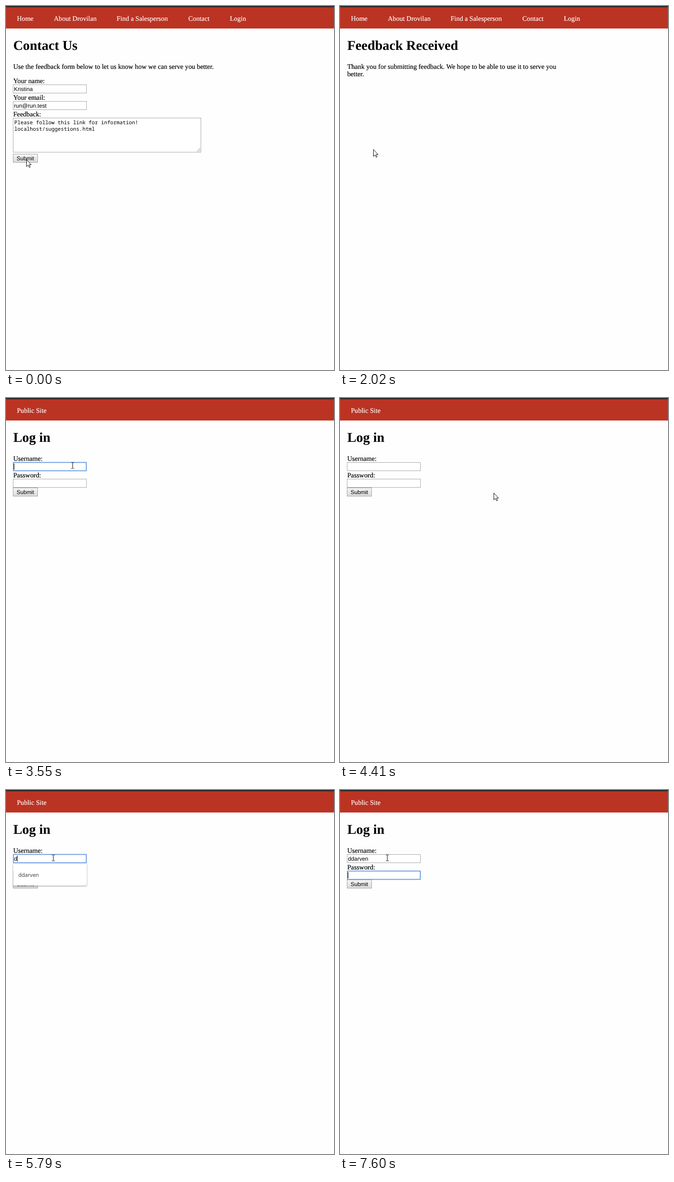
Animation of 711 by 788 pixels, one loop 8 s. Source, as an HTML page:

```html
<!DOCTYPE html>
<html lang="en">
<head>
<meta charset="utf-8">
<title>Feedback form and login</title>
<style>
html, body { margin: 0; width: 100%; height: 100%; overflow: hidden; background: #fefefe; }
svg { display: block; width: 711px; height: 788px; }
text { font: 14.73px "Liberation Serif", serif; white-space: pre; text-rendering: geometricPrecision; stroke: #000; stroke-width: .2px; }
.nav text { font-size: 14.7px; fill: #fff; stroke: #fff; }
.h { font-size: 29.33px; font-weight: bold; stroke: none; }
.field { font: 12.2px "Liberation Sans", sans-serif; stroke: none; }
.mono { font: 11.2px "Noto Sans Mono", monospace; stroke: none; }
.list text { font: 11.5px "Open Sans", sans-serif; fill: #333; stroke: none; }
.list rect { fill: #fff; filter: drop-shadow(0 1px 1.4px rgba(0, 0, 0, .42)); }
.box { fill: #fff; stroke: #a6a6a6; }
.ring { fill: none; stroke: #6f9fe6; stroke-width: 2; }
.btn { fill: url(#up); stroke: #a0a0a0; }
.caret { fill: #000; }

/* one 8 s timeline, every change is a hard step */
.t { animation: 8s step-end infinite; }
.contact { animation-name: contact; }
.thanks { animation-name: thanks; }
.public { animation-name: public; }
.login { animation-name: login; }
.press { animation-name: press; }
.user { animation-name: user; }
.pass { animation-name: pass; }
.blink { animation-name: blink; }
.all { animation-name: all; }
.match { animation-name: match; }
.type { animation-name: type; }
.move { animation-name: move; }
.arrow { animation-name: arrow; }
.hand { animation-name: hand; }
.beam { animation-name: beam; }

@keyframes contact { 0% { visibility: visible } 11.25%, 100% { visibility: hidden } }
@keyframes thanks { 0%, 37.125%, 100% { visibility: hidden } 11.25% { visibility: visible } }
@keyframes public { 0% { visibility: visible } 37.125%, 100% { visibility: hidden } }
@keyframes login { 0% { visibility: hidden } 37.125%, 100% { visibility: visible } }
@keyframes press { 0%, 7.375%, 100% { visibility: hidden } 5.5% { visibility: visible } }
@keyframes user {
  0%, 55.125%, 95%, 100% { visibility: hidden }
  44.375%, 62% { visibility: visible }
}
@keyframes pass { 0% { visibility: hidden } 95%, 100% { visibility: visible } }
@keyframes blink {
  0%, 51.25%, 70.5%, 95%, 100% { visibility: hidden }
  44.375%, 62%, 72.375% { visibility: visible }
}
@keyframes all {
  0%, 55.125%, 72.375%, 100% { visibility: hidden }
  45.875%, 63.875% { visibility: visible }
}
@keyframes match { 0%, 93.125%, 100% { visibility: hidden } 72.375% { visibility: visible } }
@keyframes type {
  0% { transform: translateX(17px) }
  72.375% { transform: translateX(24px) }
  74.25% { transform: translateX(31px) }
  76.125% { transform: translateX(38px) }
  79.625% { transform: translateX(42px) }
  84.625% { transform: translateX(48px) }
  86.125% { transform: translateX(55px) }
  88.125%, 100% { transform: translateX(62px) }
}
@keyframes move {
  0% { transform: translate(44px, 332px) }
  25.25% { transform: translate(72px, 310px) }
  27.375% { transform: translate(220px, 205px) }
  29.375% { transform: translate(420px, 95px) }
  31.5% { transform: translate(505px, 52px) }
  33.625% { transform: translate(497px, 27px) }
  39% { transform: translate(215px, 150px) }
  42.5% { transform: translate(150px, 147px) }
  44.375% { transform: translate(144px, 146px) }
  55.125% { transform: translate(333px, 205px) }
  60.125% { transform: translate(230px, 175px) }
  62%, 100% { transform: translate(102px, 147px) }
}
@keyframes arrow {
  0%, 37.125%, 55.125% { visibility: visible }
  33.625%, 42.5%, 62%, 100% { visibility: hidden }
}
@keyframes hand { 0%, 37.125%, 100% { visibility: hidden } 33.625% { visibility: visible } }
@keyframes beam {
  0%, 55.125% { visibility: hidden }
  42.5%, 62%, 100% { visibility: visible }
}
</style>
</head>
<body>
<svg viewBox="0 0 711 788">
  <defs>
    <linearGradient id="up" x2="0" y2="1"><stop stop-color="#f6f6f6"/><stop offset="1" stop-color="#dadada"/></linearGradient>
    <linearGradient id="down" x2="0" y2="1"><stop stop-color="#d6d6d6"/><stop offset="1" stop-color="#f4f4f4"/></linearGradient>
    <clipPath id="typed"><rect class="t type" x="-100" y="138" width="100" height="21"/></clipPath>
    <rect id="input" class="box" x="15.5" y=".5" width="159" height="18"/>
    <rect id="focus" class="ring" x="16" y="0" width="158" height="18"/>
    <g id="submit">
      <rect class="btn" x="15.5" y=".5" width="53" height="18"/>
      <text class="field" x="23" y="14">Submit</text>
    </g>
  </defs>

  <rect width="711" height="788" fill="#fefefe"/>
  <rect width="711" height="48.7" fill="#bb3323"/>
  <rect width="711" height="2.7" fill="#2b2a2a"/>

  <g class="nav t public">
    <text x="23.7" y="32">Home</text>
    <text x="103.7" y="32">About Drovilan</text>
    <text x="239.8" y="32">Find a Salesperson</text>
    <text x="395.3" y="32">Contact</text>
    <text x="485.3" y="32">Login</text>
  </g>

  <g class="t contact">
    <text class="h" x="15.7" y="95">Contact Us</text>
    <text x="15.7" y="136">Use the feedback form below to let us know how we can serve you better.</text>
    <text x="15.7" y="167">Your name:</text>
    <use href="#input" y="170"/>
    <text class="field" x="17.3" y="184.3">Kristina</text>
    <text x="15.7" y="203">Your email:</text>
    <use href="#input" y="206"/>
    <text class="field" x="17.3" y="220.3">run@run.test</text>
    <text x="15.7" y="239">Feedback:</text>
    <rect class="box" x="15.5" y="242.5" width="407" height="74"/>
    <text class="mono" x="18" y="256">Please follow this link for information!</text>
    <text class="mono" x="18" y="269.5">localhost/suggestions.html</text>
    <path d="M414 315l7-7M418 315l3-3" stroke="#777" fill="none"/>
    <use href="#submit" y="320"/>
  </g>
  <g class="t press">
    <rect x="15.5" y="320.5" width="53" height="18" fill="url(#down)" stroke="#8f8f8f"/>
    <text class="field" x="23" y="334">Submit</text>
  </g>

  <g class="t thanks">
    <text class="h" x="15.7" y="95">Feedback Received</text>
    <text x="15.7" y="136">Thank you for submitting feedback. We hope to be able to use it to serve you</text>
    <text x="15.7" y="152">better.</text>
  </g>

  <g class="t login">
    <g class="nav"><text x="23.7" y="32">Public Site</text></g>
    <text class="h" x="15.7" y="95">Log in</text>
    <text x="15.7" y="136">Username:</text>
    <use href="#input" y="139"/>
    <text x="15.7" y="172">Password:</text>
    <use href="#input" y="175"/>
    <use href="#submit" y="194"/>
    <g clip-path="url(#typed)"><text class="field" x="17.3" y="152.6">ddarven</text></g>
  </g>
  <g class="t user"><use href="#focus" y="139.5"/></g>
  <g class="t blink"><rect class="caret t type" y="142" width="1" height="13"/></g>
  <g class="t pass">
    <use href="#focus" y="175.5"/>
    <rect class="caret" x="17" y="178" width="1" height="13"/>
  </g>

  <g class="list t all">
    <rect x="15.5" y="159" width="176.5" height="213.5" rx="2"/>
    <text x="26.7" y="187.5">rtd222</text>
    <text x="26.7" y="220.5">tbrook</text>
    <text x="26.7" y="253.5">Meadowbenn@inbox.test</text>
    <text x="26.7" y="286.5">zivamelz@inbox.test</text>
    <text x="26.7" y="319.5">Bomwee@inbox.test</text>
    <text x="26.7" y="352.5">tedkirl</text>
  </g>
  <g class="list t match">
    <rect x="15.5" y="159" width="159.5" height="48" rx="2"/>
    <text x="26.7" y="187.5">ddarven</text>
  </g>

  <g class="t move" stroke="#000" fill="#fff">
    <path class="t arrow" d="M.5.7V15.6L4 12.4l2.4 5.2 2.2-1-2.3-5H10.7Z"/>
    <path class="t hand" transform="translate(-6.5) scale(1.13 1.03)" stroke-width=".9" d="M5 1.5C5 .2 8 .2 8 1.5V7c0-1 3-1 3 .4V8c0-1 2.6-.8 2.6.6v.6c0-1 2.4-.8 2.4.6V14c0 3-1.5 3.5-1.5 6.5H6.3c0-2-2-3.5-3-5.5L.7 11.5C0 10 1.8 9 3 10.2L5 12Z"/>
    <path class="t beam" fill="none" d="M-2.5-6.5h2l1 .7 1-.7h2M.5-6V6M-2.5 6.5h2l1-.7 1 .7h2"/>
  </g>
</svg>
</body>
</html>
```
